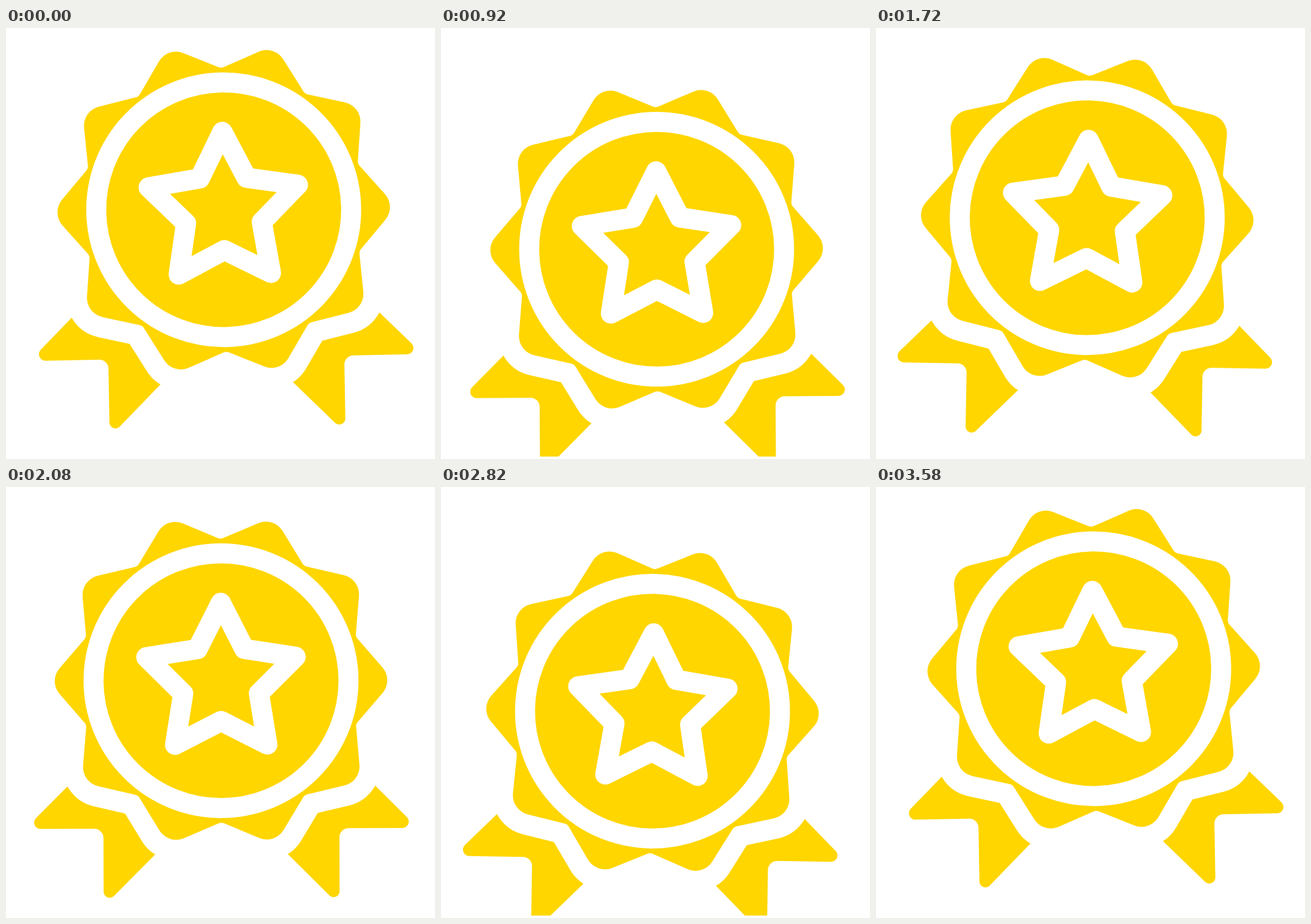
Recreate the animation shown at these times as an HTML page with a canvas. Size 700 by 704 pixels, loop 3600 ms.

```html
<!DOCTYPE html>
<html lang="en">
<head>
<meta charset="utf-8">
<title>Award rosette</title>
<style>
  html, body { margin: 0; width: 100%; height: 100%; overflow: hidden; background: #fff; }
  canvas { display: block; }
</style>
</head>
<body>
<canvas id="stage" width="700" height="704"></canvas>
<script>
const ctx = document.getElementById('stage').getContext('2d');
const GOLD = '#ffd600', WHITE = '#fff';
const LOOP = 3600, LEAD = 10;
const LIFT = 60.7, BOB = 1800;
// Times at which the sway turns, alternating between -1 and +1 degree.
const TURNS = [0, 557, 1165, 1710, 2400, 2895, LOOP];

// Closed polygon from [x, y, cornerRadius] points.
function rounded(points) {
  const path = new Path2D();
  const [ax, ay] = points[points.length - 1], [bx, by] = points[0];
  path.moveTo((ax + bx) / 2, (ay + by) / 2);
  points.forEach(([x, y, r], i) => {
    const [nx, ny] = points[(i + 1) % points.length];
    path.arcTo(x, y, nx, ny, r);
  });
  path.closePath();
  return path;
}

// Regular star pointing up, or with a valley up when turned by one half step.
function star(tips, outer, inner, tipRadius, dipRadius, turn) {
  const points = [];
  for (let i = 0; i < tips * 2; i++) {
    const a = (i + turn) * Math.PI / tips - Math.PI / 2;
    const r = i % 2 ? inner : outer;
    points.push([r * Math.cos(a), r * Math.sin(a), i % 2 ? dipRadius : tipRadius]);
  }
  return rounded(points);
}

const rosette = star(10, 281.6, 231.2, 32, 11, 1);
const emblem = star(5, 128, 65, 0, 0, 0);
const ribbon = rounded([
  [180, 101, 0], [320.4, 241.4, 10.5], [192.5, 241.4, 15],
  [192.5, 367.9, 9.8], [40, 215.4, 0]
]);
const ring = new Path2D();
ring.arc(0, 0, 208, 0, Math.PI * 2);

const ease = u => (1 - Math.cos(Math.PI * u)) / 2;

function sway(t) {
  let i = 0;
  while (t >= TURNS[i + 1]) i++;
  const u = ease((t - TURNS[i]) / (TURNS[i + 1] - TURNS[i]));
  return (i % 2 ? 1 : -1) * (1 - 2 * u);
}

function stroke(path, width) {
  ctx.lineWidth = width;
  ctx.stroke(path);
}

function draw(now) {
  const t = (now + LEAD) % LOOP;
  ctx.setTransform(1, 0, 0, 1, 0, 0);
  ctx.fillStyle = WHITE;
  ctx.fillRect(0, 0, 700, 704);

  ctx.save();
  ctx.beginPath();
  ctx.rect(0, 0, 700, 700);
  ctx.clip();
  ctx.translate(0, LIFT * ease(2 * t / BOB));
  ctx.rotate(sway(t) * Math.PI / 180);
  ctx.translate(350, 303);

  ctx.fillStyle = GOLD;
  ctx.strokeStyle = WHITE;
  ctx.lineJoin = 'round';
  ctx.fill(ribbon);
  ctx.scale(-1, 1);
  ctx.fill(ribbon);
  ctx.scale(-1, 1);

  stroke(rosette, 67);
  ctx.fill(rosette);
  stroke(ring, 32.6);
  ctx.translate(0, 0.9);
  stroke(emblem, 33);
  ctx.restore();
}

const start = performance.now();
function tick() {
  draw(performance.now() - start);
  requestAnimationFrame(tick);
}
tick();
</script>
</body>
</html>
```
